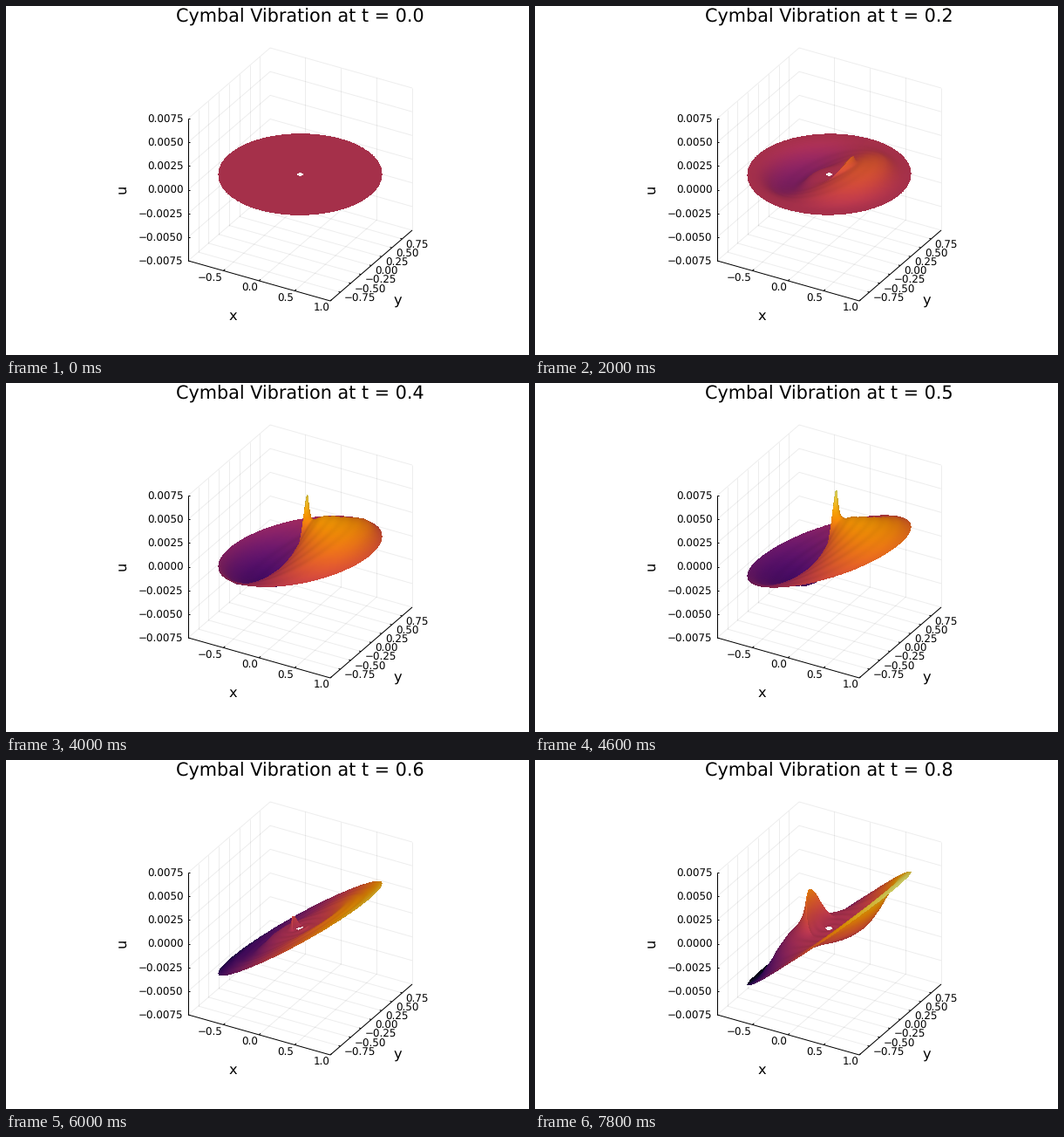
A matplotlib script that plays this animation: 600 px wide and 400 px high, repeating every 8 s.

```python
import numpy as np
import matplotlib
import matplotlib.pyplot as plt
from matplotlib.animation import FuncAnimation

W, H, DPI = 600, 400, 100
FRAMES, INTERVAL, DT = 40, 200, 0.02

plt.rcParams["font.family"] = "DejaVu Sans"
plt.rcParams["text.hinting"] = "none"

# Screen vectors of the unit axes, measured from the middle of the box
CENTER = np.array([337.5, 193.0])
EX, EY, EZ = np.array([81.5, 23.0]), np.array([47.0, -40.5]), np.array([0.0, -81.5])
CAMERA = (0.433, -0.75, 0.5)
X_MIN, Y_MAX = -0.995, 0.995


def project(x, y, z):
    return CENTER + x * EX + y * EY + z * EZ


fig = plt.figure(figsize=(W / DPI, H / DPI), dpi=DPI, facecolor="white")
ax = fig.add_axes([0, 0, 1, 1])
ax.set_xlim(0, W)
ax.set_ylim(H, 0)
ax.axis("off")


def line(p, q, **style):
    ax.plot([p[0], q[0]], [p[1], q[1]], solid_capstyle="butt", **style)


def label(x, y, text, px, **style):
    return ax.text(x, y, text, fontsize=px * 72 / DPI, color="black", **style)


def number(value, digits):
    return f"{value:.{digits}f}".replace("-", "\u2212")


GRID = dict(color="black", alpha=0.07, lw=0.72, zorder=1)
AXIS = dict(color="black", lw=0.72, zorder=4)
TICK_PX, GUIDE_PX, TITLE_PX = 11.9, 16.3, 20.8


def draw_box():
    for x in (-0.5, 0.0, 0.5, 1.0):
        bx = 2 * (x - X_MIN) / (1 - X_MIN) - 1
        p = project(bx, -1, -1)
        back = project(bx, 1, -1)
        line(p, back, **GRID)
        line(back, project(bx, 1, 1), **GRID)
        line(p, p + EY * 0.04, **AXIS)
        label(p[0] - 0.8, p[1] + 12, number(x, 1), TICK_PX, ha="right", va="baseline")

    for y in np.arange(-0.75, 0.8, 0.25):
        by = y / Y_MAX
        p = project(1, by, -1)
        back = project(-1, by, -1)
        line(p, back, **GRID)
        line(back, project(-1, by, 1), **GRID)
        line(p, p - EX * 0.025, **AXIS)
        label(p[0] + 4.2, p[1] + 10.6, number(y, 2), TICK_PX, ha="left", va="baseline")

    for z in np.linspace(-1, 1, 7):
        p = project(-1, -1, z)
        back = project(-1, 1, z)
        line(p, back, **GRID)
        line(back, project(1, 1, z), **GRID)
        line(p, p + np.array([2.0, 0.0]), **AXIS)
        label(203.5, p[1] + 4.7, number(z * 0.0075, 4), TICK_PX, ha="right", va="baseline")

    corner = project(-1, -1, -1)
    front = project(1, -1, -1)
    line(corner, project(-1, -1, 1), **AXIS)
    line(corner, front, **AXIS)
    line(front, project(1, 1, -1), **AXIS)

    label(260, 360, "x", GUIDE_PX, ha="center", va="baseline")
    label(449, 342.5, "y", GUIDE_PX, ha="center", va="baseline")
    label(134, 210, "u", GUIDE_PX, ha="center", va="center", rotation=90)


draw_box()
title = label(337.7, 19, "", TITLE_PX, ha="center", va="baseline")

# Dense polar sampling of the plate
NR, NA = 700, 900
r = np.linspace(0.05, 0.994, NR)
phi = np.linspace(0, 2 * np.pi, NA, endpoint=False)
cos_p, sin_p = np.cos(phi), np.sin(phi)
X, Y = np.outer(r, cos_p), np.outer(r, sin_p)
SX = CENTER[0] + EX[0] * X + EY[0] * Y
SY = CENTER[1] + EX[1] * X + EY[1] * Y
order = np.argsort((EX[1] * X + EY[1] * Y).ravel(), kind="stable")
col = np.floor(SX).astype(int).ravel()[order]
base = SY.ravel()[order]

front_side = np.maximum(cos_p, 0) ** 3
back_side = np.maximum(-cos_p, 0) ** 3
ripple = 0.3 * np.sin(45 * r[:, None] + 3 * phi)
gain = 51 * (0.5 / r) ** 0.25 * r / (r + 0.06)
lut = matplotlib.colormaps["inferno"](np.arange(256))[:, :3]


def smooth(v):
    v = np.clip(v, 0, 1)
    return v * v * (3 - 2 * v)


def step(v):
    return 0.5 * (1 + np.tanh(1.2 * v))


def spike(at, width):
    return np.exp(-np.abs(r - at) / width)


def lift(t):
    """Height of the plate in pixels on the polar mesh."""
    w = 0.1 + 0.2 * t
    ramp = smooth(t / 0.42)
    ring = step((r - 0.5 + t) / w) * step((0.56 + t - r) / w)
    loss = smooth((t - 0.42) / 0.2) * step((t - 0.15 - r) / 0.25)
    echo = step((r + t - 1.56) / w)
    wave = ramp * gain * (ring * (1 - loss) + echo)

    # A peak runs inward, flips through the hole and runs out again
    focus = max(0.5 - t, 0.1)
    inward = 4.3 / focus * smooth(t / 0.15) * smooth((0.62 - t) / 0.16)
    dip = np.interp(t, [0.47, 0.54, 0.6], [0, 34, 0])
    outward = np.interp(t, [0.55, 0.66, 0.78], [0, 30, 40])

    h = np.outer(wave, cos_p)
    h += np.outer(inward * spike(focus, 0.03), front_side)
    h -= np.outer(dip * spike(0.11, 0.03), back_side)
    h += np.outer(outward * spike(max(t - 0.5, 0.05), 0.2 * max(t - 0.5, 0.1)), back_side)
    return h + ripple * (ramp * ring)[:, None]


def render(t):
    h = lift(t)
    flat = h.ravel()[order]
    row = np.clip(np.floor(base - flat).astype(int), 0, H - 1)

    # Far samples are written first, near ones cover them
    seen = np.full((H, W), -1)
    seen[row, col] = order
    mask = seen >= 0
    k = seen[mask]
    i, j = np.divmod(k, NA)

    z = h / 81.5
    up, down = np.minimum(i + 1, NR - 1), np.maximum(i - 1, 0)
    zr = (z[up, j] - z[down, j]) / (r[up] - r[down])
    za = (z[i, (j + 1) % NA] - z[i, j - 1]) / (2 * phi[1] * r[i])
    zx = zr * cos_p[j] - za * sin_p[j]
    zy = zr * sin_p[j] + za * cos_p[j]
    cx, cy, cz = CAMERA
    facing = np.abs(cz - cx * zx - cy * zy) / np.sqrt(1 + zx**2 + zy**2)
    light = 0.76 + 0.24 * facing

    shade = np.clip((0.5 + z[i, j] / 2) * 256, 0, 255).astype(int)
    img = np.zeros((H, W, 4))
    img[mask, :3] = np.clip(lut[shade] * light[:, None], 0, 1)
    img[mask, 3] = 1
    return img


plate = ax.imshow(render(0), extent=(0, W, H, 0), interpolation="nearest",
                  aspect="auto", zorder=3)


def update(n):
    t = n * DT
    title.set_text(f"Cymbal Vibration at t = {t:.1f}")
    plate.set_data(render(t))
    return plate, title


anim = FuncAnimation(fig, update, frames=FRAMES, interval=INTERVAL,
                     repeat=True, repeat_delay=0, blit=False)
plt.show()
```
